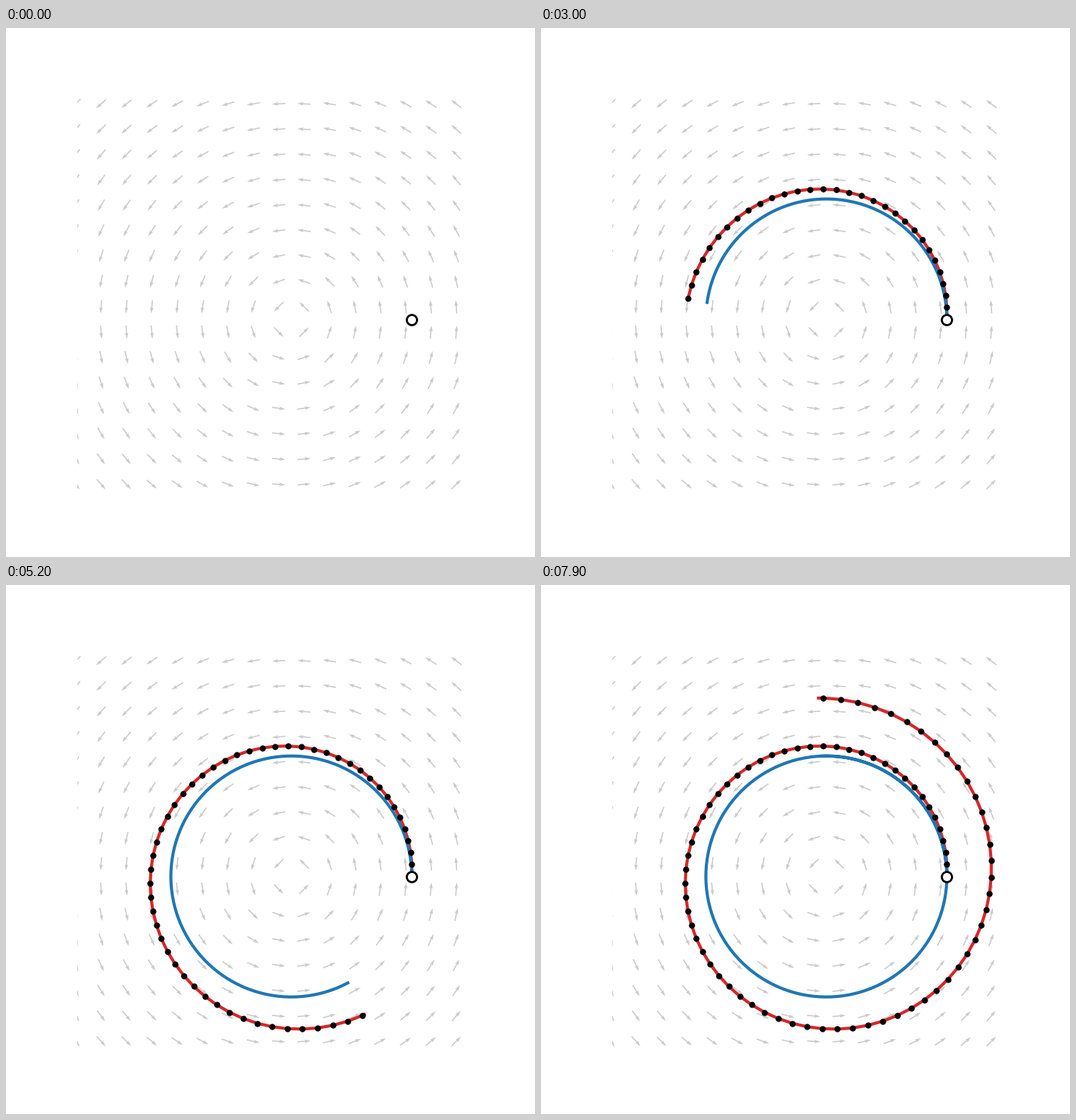
Animation of 720 by 720 pixels, one loop 8000 ms. Source, as a matplotlib script:

```python
import numpy as np
import matplotlib.pyplot as plt
from matplotlib.animation import FuncAnimation

SIZE, DPI = 720, 100
FRAMES, INTERVAL = 80, 100
STEP = 0.1            # Euler step, also time per frame
LAG = 1.0031          # the red line runs slightly ahead of the dots

UNIT = 164.0          # pixels per data unit
CX, CY = 388.4, 396.7  # origin, in pixels from the top left
LEFT, TOP, SIDE = 96.8, 91.0, 544.5

fig = plt.figure(figsize=(SIZE / DPI, SIZE / DPI), dpi=DPI, facecolor="white")
ax = fig.add_axes([LEFT / SIZE, 1 - (TOP + SIDE) / SIZE, SIDE / SIZE, SIDE / SIZE])
ax.set_xlim((LEFT - CX) / UNIT, (LEFT + SIDE - CX) / UNIT)
ax.set_ylim((CY - TOP - SIDE) / UNIT, (CY - TOP) / UNIT)
ax.set_axis_off()

# Rotation field x' = -y, y' = x
side = np.linspace(-2, 2, 20)
gx, gy = np.meshgrid(side, side)
norm = np.hypot(gx, gy)
ax.quiver(gx, gy, -gy / norm, gx / norm, pivot="mid", scale=30,
          width=0.003, color="#cccccc", zorder=1)

# Explicit Euler: z -> z + ih z
euler = (1 + 1j * STEP) ** np.arange(FRAMES + 2)

cap = dict(lw=3, solid_capstyle="projecting")
red, = ax.plot([], [], color="tab:red", zorder=2, **cap)
blue, = ax.plot([], [], color="tab:blue", zorder=3, **cap)
dots, = ax.plot([], [], "ko", ms=5, zorder=4)
ax.plot([1], [0], "o", ms=10, mew=2, mfc="white", mec="black", zorder=5)


def put(line, z):
    line.set_data(z.real, z.imag)


def partial(pos):
    """Euler polyline up to a fractional step."""
    n = int(pos)
    tip = euler[n] + (pos - n) * (euler[n + 1] - euler[n])
    return np.append(euler[:n + 1], tip)


def update(i):
    if i == 0:
        for line in (red, blue, dots):
            line.set_data([], [])
    else:
        put(red, partial(i * LAG))
        put(blue, np.exp(1j * np.linspace(0, i * STEP, 4 * i + 1)))
        put(dots, euler[1:i + 1])
    return red, blue, dots


anim = FuncAnimation(fig, update, frames=FRAMES, interval=INTERVAL,
                     init_func=lambda: update(0), repeat=True, repeat_delay=0)
plt.show()
```
